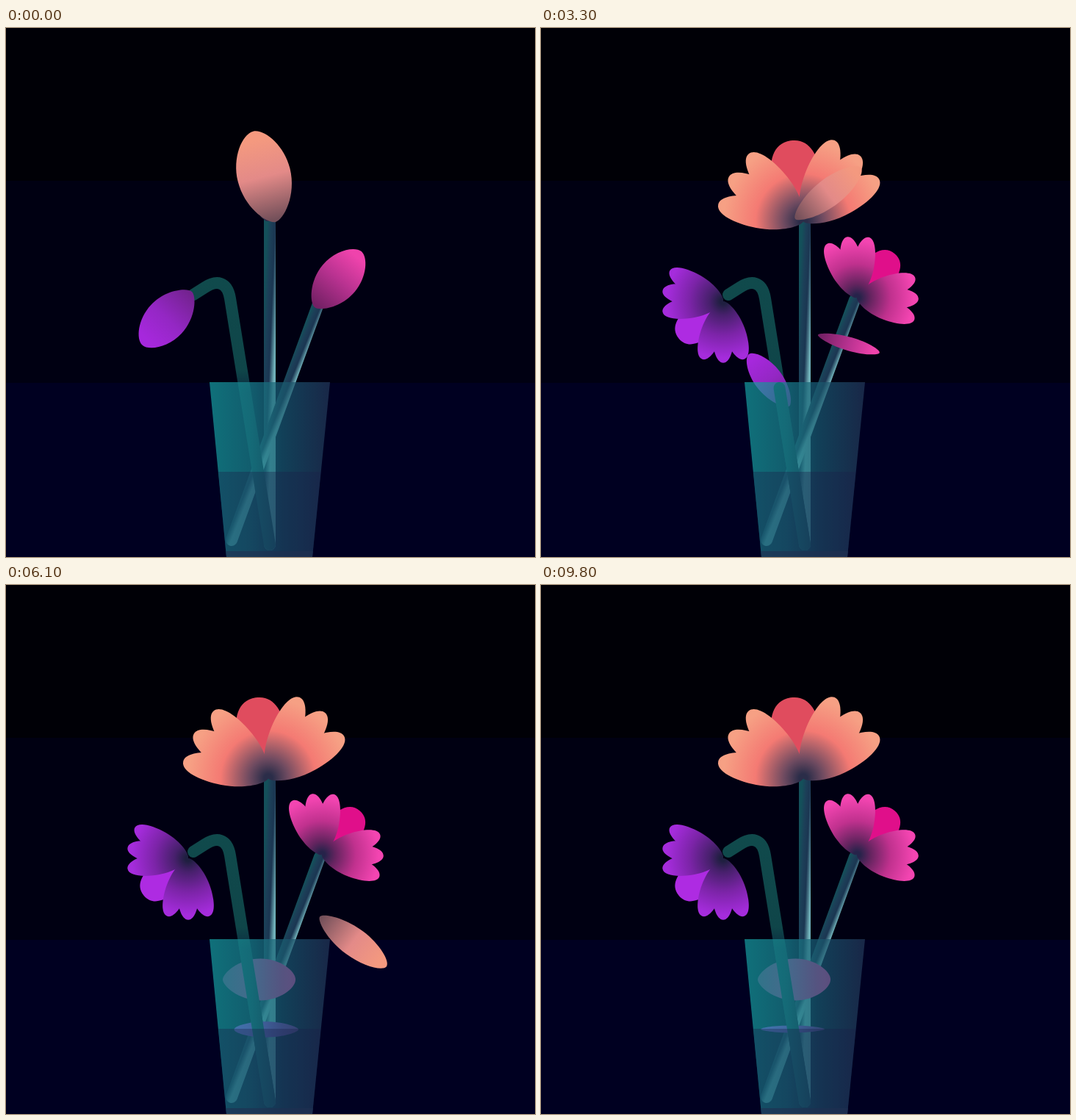
An HTML page with a canvas for the animation above (9.9 s loop, 720x720 px).

```html
<!DOCTYPE html>
<html lang="en">
<head>
<meta charset="utf-8">
<title>Flowers in a glass</title>
<style>
  html, body { margin: 0; width: 100%; height: 100%; overflow: hidden; background: #000012; }
  canvas { display: block; width: 720px; height: 720px; }
</style>
</head>
<body>
<canvas id="stage" width="720" height="720"></canvas>
<script>
const ctx = document.getElementById('stage').getContext('2d');
const LOOP = 9900, STEP = 100, DEG = Math.PI / 180;

// path: key points of the loose petal as [seconds, base x, base y, turn, flip]
const orange = {
  x: 357, y: 263, axis: -9, size: 1, budSize: 1, back: '#e04c5e',
  side: ['#2b2d49', '#6d4a60', '#f47a73', '#f6a084'],
  front: ['#f4997f', '#e38a88', '#74505a'],
  path: [[0.78, 367, 264, -14, 0], [2.2, 346, 261, 23, 36], [4.6, 346, 258, 87, 86], [8.3, 546, 735, 185, 174]],
};
const pink = {
  x: 430, y: 367, axis: 41, size: 0.71, budSize: 0.78, back: '#e00f8a',
  side: ['#26234a', '#64245f', '#c0318e', '#f345b1'],
  front: ['#ef43ac', '#b83290', '#732064'],
  path: [[0.15, 420, 380, 40, 0], [2.2, 422, 352, 115, 70], [5.3, 295, 537, 90, 180]],
};
const purple = {
  x: 248, y: 372, axis: -130, size: 0.71, budSize: 0.78, back: '#ae2be2',
  side: ['#1f1f40', '#47206c', '#7c24a8', '#a52cdc'],
  front: ['#a628dc', '#9427c4', '#73238f'],
  path: [[0.15, 253, 359, -137, 0], [2.2, 272, 410, -28, 78], [4.3, 398, 610, -47, 180],
    [6.1, 398, 605, -90, 248], [9.8, 386, 604.5, -90, 280]],
};

function poseAt(path, seconds) {
  const next = path.findIndex(p => p[0] > seconds);
  if (next === 0) return path[0];
  if (next < 0) return path[path.length - 1];
  const a = path[next - 1], b = path[next], u = (seconds - a[0]) / (b[0] - a[0]);
  return a.map((v, k) => v + (b[k] - v) * u);
}

function fade(gradient, colors, stops) {
  colors.forEach((c, i) => gradient.addColorStop(stops[i], c));
  return gradient;
}

// Leaf outline from the base at the origin to the tip at (0, -length)
function petal(w, length, roundness) {
  const l = -length, tip = roundness * w;
  ctx.beginPath();
  ctx.moveTo(0, 0);
  ctx.bezierCurveTo(-0.3 * w, 0, -w, 0.22 * l, -w, 0.52 * l);
  ctx.bezierCurveTo(-w, 0.78 * l, -tip, l, 0, l);
  ctx.bezierCurveTo(tip, l, w, 0.78 * l, w, 0.52 * l);
  ctx.bezierCurveTo(w, 0.22 * l, 0.3 * w, 0, 0, 0);
  ctx.fill();
}

function rotated(angle, draw) {
  ctx.save();
  ctx.rotate(angle * DEG);
  draw();
  ctx.restore();
}

function bloom(f, seconds) {
  const u = Math.min(1, Math.max(0, (seconds - 0.15) / 1.45));
  const open = u * u * (3 - 2 * u);
  const scale = f.size * (0.88 + 0.12 * Math.sqrt(open));
  const axis = f.axis - 4 * (1 - open);
  ctx.save();
  ctx.translate(f.x, f.y);
  ctx.scale(scale, scale);
  ctx.fillStyle = f.back;
  rotated(axis, () => petal(18 + 16 * open, 111, 0.75));
  ctx.fillStyle = fade(ctx.createRadialGradient(0, 0, 0, 0, 0, 118), f.side, [0.05, 0.22, 0.55, 0.92]);
  for (const side of [-1, 1])
    for (let i = 0; i < 3; i++)
      rotated(axis + side * (70 - 20 * i) * open, () => petal(21, 118, 0.62));
  ctx.restore();
}

function loosePetal(f, seconds) {
  const [, x, y, turn, flip] = poseAt(f.path, seconds);
  const w = 36.5 * f.budSize * Math.abs(Math.cos(flip * DEG));
  const length = f.budSize * (127 - 16 * Math.abs(Math.sin(flip * DEG)));
  ctx.save();
  ctx.translate(x, y);
  ctx.rotate(turn * DEG);
  ctx.fillStyle = fade(ctx.createLinearGradient(0, -length, 0, 0), f.front, [0.1, 0.5, 0.97]);
  petal(w, length, 0.42);
  ctx.restore();
}

function quad(x0, x1, y0, x2, x3, y1, fill) {
  ctx.fillStyle = fill;
  ctx.beginPath();
  ctx.moveTo(x0, y0);
  ctx.lineTo(x1, y0);
  ctx.lineTo(x3, y1);
  ctx.lineTo(x2, y1);
  ctx.fill();
}

function stem(path, paint) {
  ctx.strokeStyle = paint;
  ctx.lineWidth = 16;
  ctx.lineCap = 'round';
  ctx.stroke(new Path2D(path));
}

const stemTones = ['#14505a', '#1c3f58', '#1b3652', '#70b0b8'];
const stemStops = [0.12, 0.35, 0.58, 0.86];
const orangeStem = fade(ctx.createLinearGradient(347, 400, 371, 401), stemTones, stemStops);
const pinkStem = fade(ctx.createLinearGradient(388.4, 440.5, 410.6, 449.5), stemTones, stemStops);
const purpleStem = fade(ctx.createLinearGradient(0, 340, 0, 710),
  ['#104a4c', '#0f4549', '#0b2c40', '#0b2c40'], [0, 0.34, 0.42, 1]);
const glass = fade(ctx.createLinearGradient(277, 0, 441, 0),
  ['rgba(22,160,160,.7)', 'rgba(25,132,142,.7)', 'rgba(25,92,112,.7)', 'rgba(35,56,88,.7)'],
  [0, 0.35, 0.6, 1]);

function background() {
  [['#000006', 0], ['#000012', 208], ['#000021', 483]].forEach(([color, y]) => {
    ctx.fillStyle = color;
    ctx.fillRect(0, y, 720, 720 - y);
  });
}

function render(seconds) {
  background();
  stem('M359 262V703', orangeStem);
  stem('M427 370L307 697', pinkStem);
  stem('M255 363L270 353.5C286 343 301 344 305 368L359 703', purpleStem);

  bloom(purple, seconds);
  bloom(pink, seconds);
  loosePetal(pink, seconds);
  loosePetal(purple, seconds);
  // Sunken petals lie behind the purple stem
  if (seconds > 2.5) stem('M324.5 490L359 703', purpleStem);

  quad(277, 441, 482, 300, 417, 720, glass);
  quad(289, 428.5, 604, 300, 417, 720, 'rgba(27,33,72,.36)');
  quad(299.3, 418, 712, 300, 417, 720, 'rgba(32,48,80,.6)');

  bloom(orange, seconds);
  loosePetal(orange, seconds);
}

function tick() {
  const t = performance.now() % LOOP;
  render(Math.floor(t / STEP) * STEP / 1000);
  requestAnimationFrame(tick);
}
tick();
</script>
</body>
</html>
```
